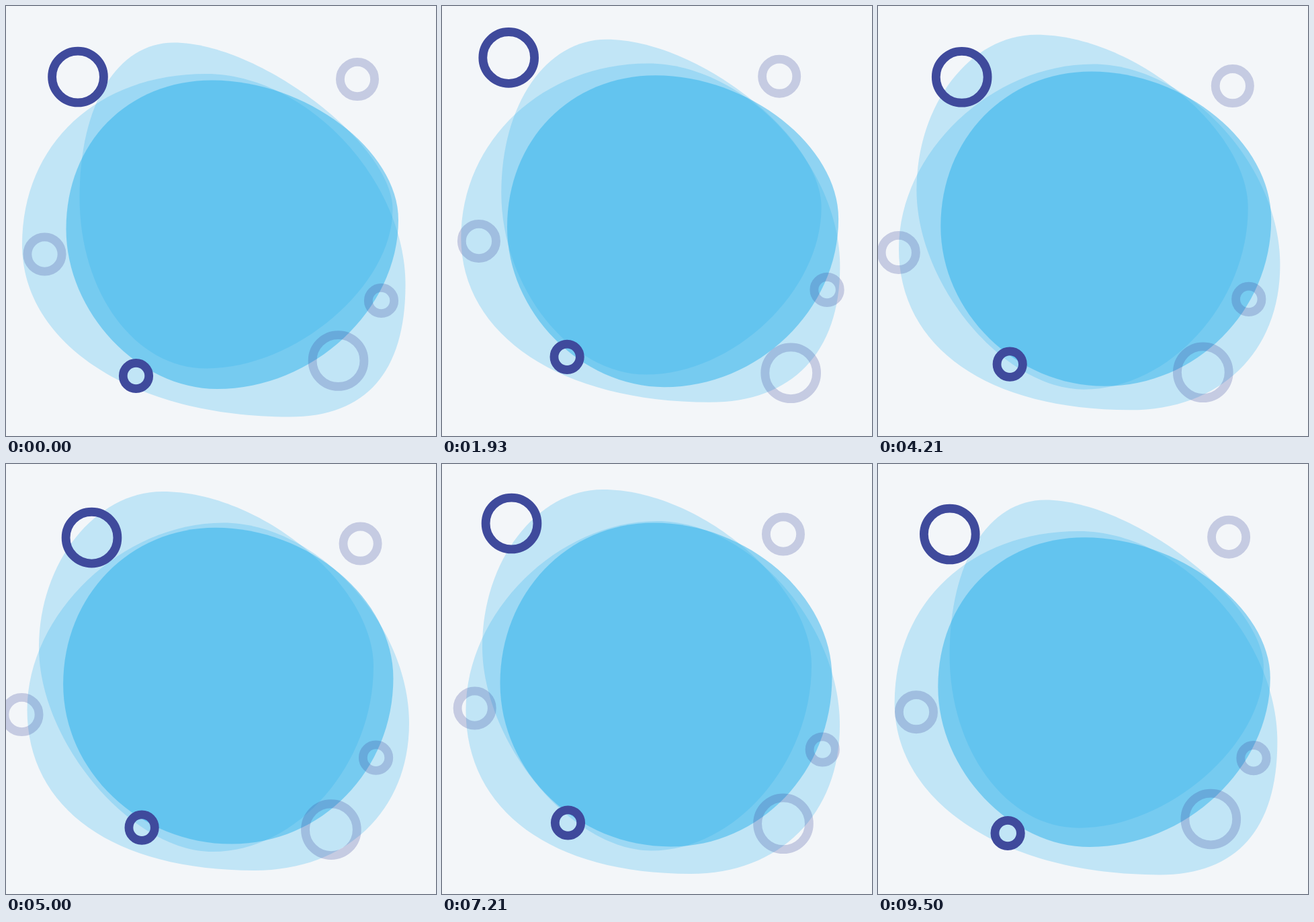
Recreate the animation shown at these times as an HTML page with a canvas. Size 640 px wide and 640 px high, loop 9570 ms.

```html
<!DOCTYPE html>
<html lang="en">
<head>
<meta charset="utf-8">
<title>Drifting blobs</title>
<style>
  html, body { margin: 0; height: 100%; overflow: hidden; background: #f3f6f9; }
  canvas { display: block; width: 100vw; height: 100vh; }
</style>
</head>
<body>
<canvas id="stage" width="640" height="640"></canvas>
<script>
const ctx = document.getElementById('stage').getContext('2d');
const LOOP = 9570, FPS = 14;

// Every part eases through four keys; "turns" are the times of the middle two.
// A blob key is its box: left, top, right, bottom. Its shape gives where each side
// is touched (fraction of the side) and the corner roundness, clockwise from the
// left side and the top-left corner; "rest" blends into "mid" during the loop.
const blobs = [
  { alpha: .25, turns: [2.5, 5],
    keys: [[109.5, 54.5, 575.5, 539.5], [85, 49, 563, 550], [49, 41, 547, 577], [60, 38, 550, 575.5]],
    rest: { touch: [.475, .301, .512, .405], round: [.6, .39, .48, .56] },
    mid: { touch: [.43, .373, .484, .525], round: [.54, .47, .53, .46] } },
  { alpha: .25, turns: [2.5, 4.9],
    keys: [[24, 101, 594.5, 611.5], [29, 83, 592, 586.5], [31.5, 87.5, 600, 605], [35.5, 85, 592, 610]],
    rest: { touch: [.498, .48, .615, .698], round: [.59, .5, .66, .58] },
    mid: { touch: [.54, .515, .575, .59], round: [.51, .5, .59, .62] } },
  { alpha: .5, turns: [3.1, 5.8],
    keys: [[89.5, 110.5, 584, 570], [100.5, 100, 593, 566], [81, 93.5, 572, 565.5], [86.5, 87.5, 580.5, 569.5]],
    rest: { touch: [.482, .44, .452, .454], round: [.58, .5, .53, .52] },
    mid: { touch: [.497, .465, .48, .52], round: [.56, .53, .56, .55] } }
];
const BLEND = [[0], [.45], [.95], [.9]];

const rings = [
  { r: 38.4, alpha: 1, turns: [2.5, 4.7], keys: [[107, 105.5], [98, 72.5], [128.5, 110.5], [103.5, 88.5]] },
  { r: 25.6, alpha: .25, turns: [2.5, 4.5], keys: [[523, 109], [499, 104], [529.5, 120], [508, 104.5]] },
  { r: 25.6, alpha: .25, turns: [2.5, 5], keys: [[57.5, 369.5], [54.5, 347], [23.5, 373], [48.7, 363.5]] },
  { r: 19.2, alpha: 1, turns: [2.5, 5.5], keys: [[193.5, 550.5], [185, 518], [203.5, 543], [187.5, 534]] },
  { r: 19.2, alpha: .25, turns: [2.5, 4.6], keys: [[558.5, 438.5], [575.3, 420], [549.5, 438], [566.3, 425]] },
  { r: 38.4, alpha: .25, turns: [2.5, 4.5], keys: [[494.5, 528], [523, 549], [481.5, 545], [508, 535.3]] }
];

const lerp = (a, b, s) => a + (b - a) * s;
const lerpAll = (from, to, s) => from.map((a, n) => lerp(a, to[n], s));

function poseAt(keys, turns, t) {
  const times = [0, ...turns, 7.2, 9.9];
  const i = times.findLastIndex(time => time <= t);
  const s = (t - times[i]) / (times[i + 1] - times[i]);
  return lerpAll(keys[i], keys[(i + 1) % 4], s * s * (3 - 2 * s));
}

function drawBlob({ alpha, turns, keys, rest, mid }, t) {
  const [left, top, right, bottom] = poseAt(keys, turns, t);
  const [blend] = poseAt(BLEND, turns, t);
  const touch = lerpAll(rest.touch, mid.touch, blend);
  const round = lerpAll(rest.round, mid.round, blend);
  const points = [
    [left, lerp(top, bottom, touch[0])], [lerp(left, right, touch[1]), top],
    [right, lerp(top, bottom, touch[2])], [lerp(left, right, touch[3]), bottom]
  ];
  ctx.globalAlpha = alpha;
  ctx.beginPath();
  ctx.moveTo(...points[0]);
  points.forEach(([x, y], i) => {
    const [x2, y2] = points[(i + 1) % 4];
    const dx = (x2 - x) * round[i], dy = (y2 - y) * round[i];
    if (i % 2) ctx.bezierCurveTo(x + dx, y, x2, y2 - dy, x2, y2);
    else ctx.bezierCurveTo(x, y + dy, x2 - dx, y2, x2, y2);
  });
  ctx.fill();
}

function drawRing({ r, alpha, turns, keys }, t) {
  const [x, y] = poseAt(keys, turns, t);
  ctx.globalAlpha = alpha;
  ctx.beginPath();
  ctx.arc(x, y, r, 0, 2 * Math.PI);
  ctx.stroke();
}

function draw(now) {
  const step = Math.min(133, Math.floor((now % LOOP) * FPS / 1000 + .07));
  const t = step / FPS;
  ctx.globalAlpha = 1;
  ctx.fillStyle = '#f3f6f9';
  ctx.fillRect(0, 0, 640, 640);
  ctx.fillStyle = '#2cb1ec';
  blobs.forEach(blob => drawBlob(blob, t));
  ctx.strokeStyle = '#3f4a9c';
  ctx.lineWidth = 12.8;
  rings.forEach(ring => drawRing(ring, t));
}

const start = performance.now();
function tick() {
  draw(performance.now() - start);
  requestAnimationFrame(tick);
}
tick();
</script>
</body>
</html>
```
